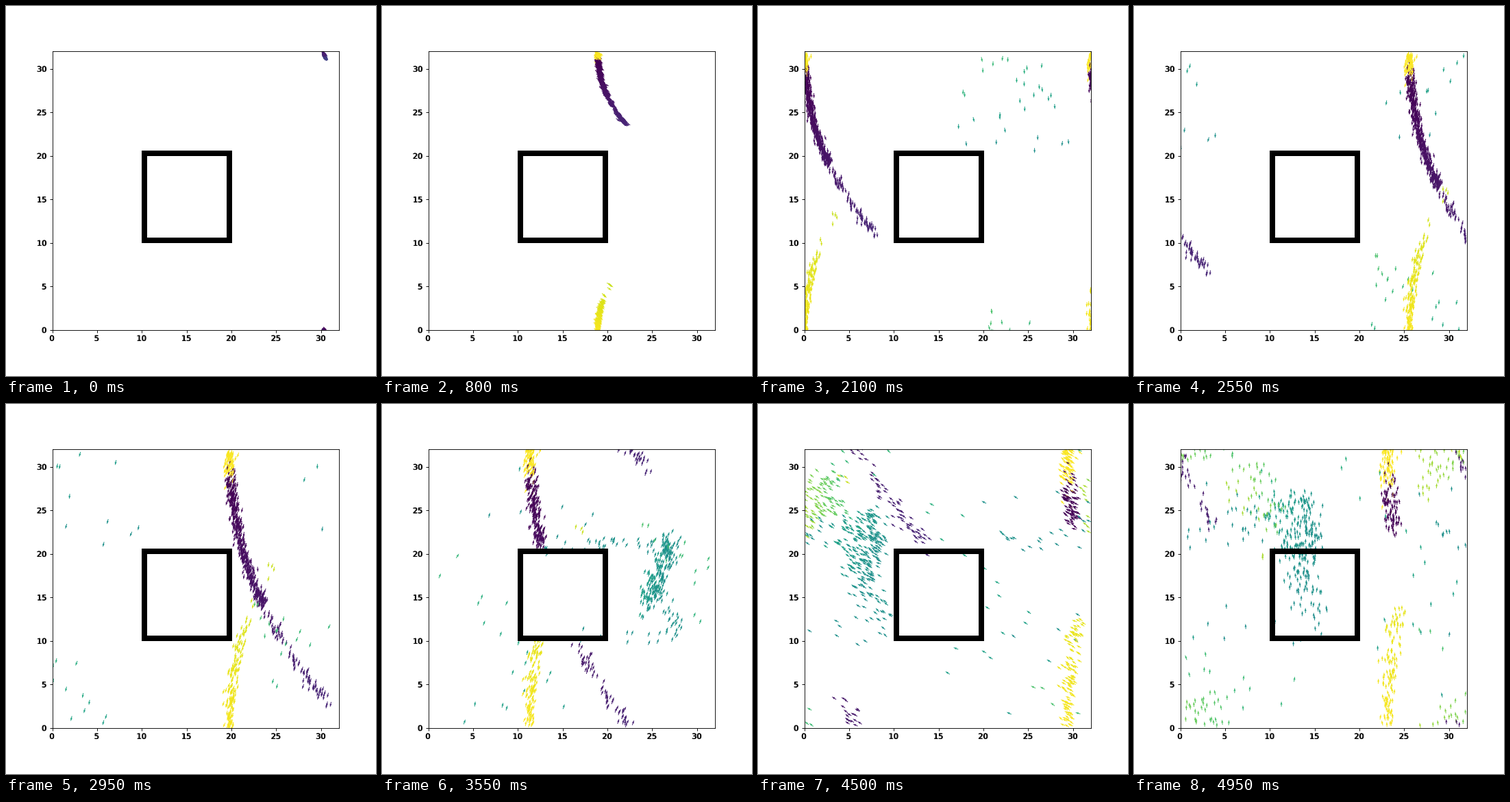
A matplotlib script for the animation above (5 s loop, 540 by 540 pixels).

```python
import numpy as np
import matplotlib.pyplot as plt
from matplotlib.animation import FuncAnimation
from matplotlib.patches import Rectangle
from matplotlib.patheffects import Normal, Stroke

SIZE = 32.0
SPEED = 0.7175
START = (30.9, 32.0)
FRAMES = 100
TAU = 2 * np.pi
rng = np.random.default_rng(4)


def launch_angles():
    """Downward tilt of each member's leftward flight."""
    core = 0.43 * rng.random(520) ** 1.1
    tail = 0.43 + 0.31 * rng.random(130) ** 0.7
    upper = -np.minimum(np.abs(rng.normal(0, 0.17, 160)), 0.45)
    return np.concatenate([core, tail, upper])


def in_box(pos):
    x, y = pos.T
    return (x > 10) & (x < 20) & (y > 10) & (y < 20.5)


def crowded(pos, others, radius=0.9, limit=4):
    gap = np.abs(pos[:, None] - others[None])
    gap = np.minimum(gap, SIZE - gap)
    return (np.hypot(gap[..., 0], gap[..., 1]) < radius).sum(axis=1) >= limit


def simulate():
    """Straight flight, rebounds at the box, and turns where flocks cross."""
    tilt = launch_angles()
    n = len(tilt)
    heading = tilt + np.pi
    pos = np.tile(START, (n, 1))
    slips = (tilt > 0.45) & (rng.random(n) < 0.55)
    since = np.full(n, -1)
    turned = np.zeros(n, bool)
    states = []
    for _ in range(FRAMES):
        step = SPEED * np.column_stack([np.cos(heading), np.sin(heading)])
        ahead = (pos + step) % SIZE

        # steeper hits scatter more
        hit = in_box(ahead) & (np.cos(heading) < 0) & ~slips
        slope = np.sin(heading[hit])
        heading[hit] = slope ** 2 * rng.uniform(0, 3.5, hit.sum())
        since[hit] = 0
        pos = np.where(hit[:, None], pos, ahead)

        # leftward flyers swing upward when they run into an older rebound
        veterans = (since > 12) & ~turned
        leftward = (since < 0) & ~turned
        meet = leftward & crowded(pos, pos[veterans])
        heading[meet] = np.pi * rng.uniform(0.45, 0.78, meet.sum())
        turned |= meet

        since[since >= 0] += 1
        states.append((pos.copy(), heading.copy()))
    return states


states = simulate()
count = len(states[0][0])
jitter = rng.normal(0, 1, (count, 2))
tint = rng.normal(0, 0.015, count)
wobble = rng.normal(0, 0.1, count)


def shared_direction(f):
    """All arrows point along one slowly swinging direction."""
    return np.radians(np.interp(f, [0, 16, 42, 59, 71, 81, 99],
                                [300, 325, 270, 255, 70, 200, 92]))


fig = plt.figure(figsize=(6.75, 6.75), dpi=80)
ax = fig.add_axes([0.125, 0.1241, 0.775, 0.7528])
ax.set(xlim=(0, SIZE), ylim=(0, SIZE),
       xticks=range(0, 31, 5), yticks=range(0, 31, 5))
for label in ax.get_xticklabels() + ax.get_yticklabels():
    label.set_path_effects([
        Stroke(linewidth=0.2, foreground="black", offset=(-0.8, 0)), Normal()])
ax.add_patch(Rectangle((10.28, 10.31), 9.48, 10, fill=False, ec="black",
                       lw=7.2, joinstyle="miter", zorder=3))

zeros = np.zeros(count)
arrows = ax.quiver(zeros, zeros, zeros + 1, zeros, zeros, cmap="viridis",
                   clim=(0, 1), scale=54, width=0.0024, zorder=2)


def update(f):
    pos, heading = states[f]
    spread = 0.04 + 0.0045 * f
    sway = 0.06 - 0.6 * np.exp(-f / 2)
    angle = shared_direction(f) + wobble
    arrows.set_offsets((pos + spread * jitter) % SIZE)
    arrows.set_UVC(np.cos(angle), np.sin(angle),
                   (heading - np.pi - sway + tint) / TAU % 1)
    return (arrows,)


anim = FuncAnimation(fig, update, frames=FRAMES, interval=50,
                     repeat=True, repeat_delay=0, blit=False)
plt.show()
```
